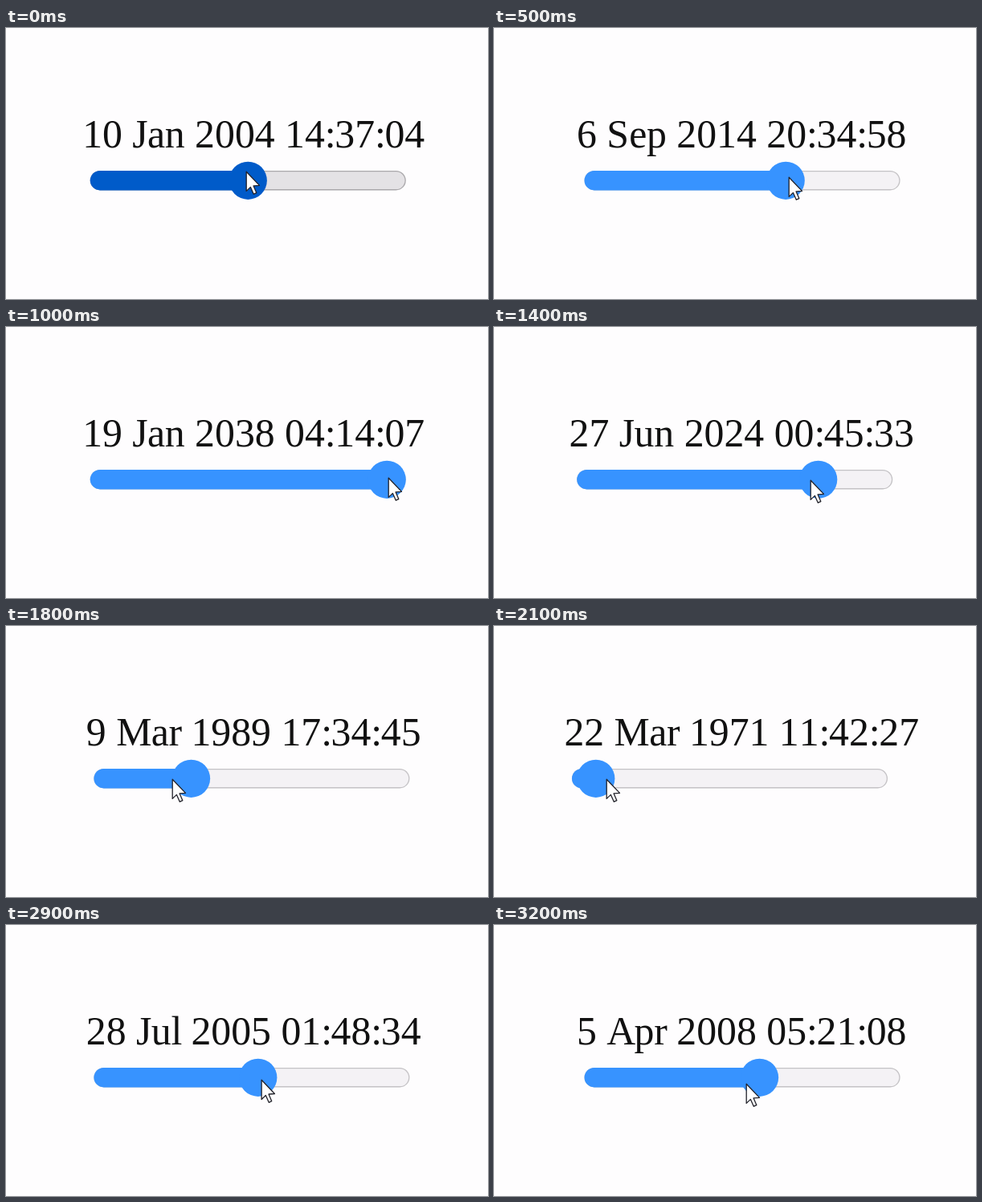
Write an HTML page with a canvas that moves like this. It is 600 px wide and 338 px high and loops after 3300 ms.

```html
<!DOCTYPE html>
<html lang="en">
<head>
<meta charset="utf-8">
<title>Date slider</title>
<style>
  html, body { margin: 0; width: 100%; height: 100%; overflow: hidden; background: #fefdfe; }
  canvas { display: block; }
</style>
</head>
<body>
<canvas id="stage" width="600" height="338"></canvas>
<script>
const ctx = document.getElementById('stage').getContext('2d');
const LOOP = 3300, STEP = 100, PRESS = 3;
const CENTER = 308.2, BASELINE = 148.5, ZOOM = 3.11;
const FAMILY = '"Liberation Serif", "Times New Roman", serif';
const TRACK = { w: 393, y: 178, h: 24.4, inset: 9.6 };
const THUMB = { r: 23.6, y: 190.3 };
const IDLE = { fill: '#005bc9', track: '#e4e2e5', border: '#aaa8ab' };
const ACTIVE = { fill: '#3793ff', track: '#f4f2f5', border: '#c4c2c5' };
const MONTHS = 'Jan Feb Mar Apr May Jun Jul Aug Sep Oct Nov Dec'.split(' ');

const parse = s => Date.parse(s + ' UTC') / 1000;
const MIN = parse('1 Jan 1970 01:00:00'), MAX = parse('19 Jan 2038 04:14:07');

// step, slider date, pointer x, pointer y
const keys = [
  [0, '10 Jan 2004 14:37:04', 299, 179],
  [2, '10 Jan 2004 14:37:04', 299, 179],
  [5, '6 Sep 2014 20:34:58', 367, 186],
  [8, '14 Feb 2032 09:12:41', 455, 188],
  [9, '2 Oct 2037 18:20:13', 474, 188],
  [10, '19 Jan 2038 04:14:07', 476, 188],
  [11, '19 Jan 2038 04:14:07', 472, 189],
  [14, '27 Jun 2024 00:45:33', 394, 191],
  [18, '9 Mar 1989 17:34:45', 207, 191],
  [21, '22 Mar 1971 11:42:27', 140, 191],
  [23, '1 Jan 1970 01:00:00', 133, 190],
  [26, '4 Mar 1976 14:24:31', 171, 188],
  [30, '17 Mar 2013 16:08:52', 354, 195],
  [32, '5 Apr 2008 05:21:08', 314, 198],
  [33, '10 Jan 2004 14:37:04', 299, 179]
].map(([t, date, x, y]) => [t, parse(date), x, y]);

// Smooth curve through one column of the keys
function curve(step, col) {
  let i = 0;
  while (i < keys.length - 2 && keys[i + 1][0] <= step) i++;
  const a = keys[i], b = keys[i + 1];
  const before = keys[Math.max(i - 1, 0)], after = keys[Math.min(i + 2, keys.length - 1)];
  const slope = (p, q) => (q[col] - p[col]) / (q[0] - p[0]);
  const d = b[0] - a[0], u = (step - a[0]) / d;
  if (a[col] === b[col]) return a[col];
  const m0 = slope(before, b) * d, m1 = slope(a, after) * d;
  const u2 = u * u, u3 = u2 * u;
  return (2 * u3 - 3 * u2 + 1) * a[col] + (u3 - 2 * u2 + u) * m0 +
         (3 * u2 - 2 * u3) * b[col] + (u3 - u2) * m1;
}

function format(sec) {
  const d = new Date(sec * 1000);
  const time = [d.getUTCHours(), d.getUTCMinutes(), d.getUTCSeconds()]
    .map(n => String(n).padStart(2, '0')).join(':');
  return `${d.getUTCDate()} ${MONTHS[d.getUTCMonth()]} ${d.getUTCFullYear()} ${time}`;
}

// Magnified 16px text: every glyph advances by whole pixels before zooming
function drawLabel(label) {
  ctx.font = `160px ${FAMILY}`;
  const steps = [...label].map(c => Math.floor(ctx.measureText(c).width / 10 + 0.4) * ZOOM);
  const left = CENTER - steps.reduce((a, b) => a + b) / 2;
  ctx.font = `${16 * ZOOM}px ${FAMILY}`;
  ctx.fillStyle = '#111';
  let x = left;
  [...label].forEach((c, i) => {
    ctx.fillText(c, x, BASELINE);
    x += steps[i];
  });
  return left;
}

function pill(x, y, w, h, color) {
  ctx.fillStyle = color;
  ctx.beginPath();
  ctx.roundRect(x, y, w, h, h / 2);
  ctx.fill();
}

function drawSlider(left, part, look) {
  const { w, y, h } = TRACK;
  const x = left + THUMB.r + part * (w - 2 * THUMB.r);
  pill(left, y, w, h, look.border);
  pill(left + 1.3, y + 1.3, w - 2.6, h - 2.6, look.track);
  ctx.save();
  ctx.beginPath();
  ctx.rect(0, 0, x, 338);
  ctx.clip();
  pill(left, y, w, h, look.fill);
  ctx.restore();
  ctx.fillStyle = look.fill;
  ctx.beginPath();
  ctx.arc(x, THUMB.y, THUMB.r, 0, Math.PI * 2);
  ctx.fill();
}

function drawPointer(x, y) {
  ctx.save();
  ctx.translate(x - 0.5, y - 0.6);
  ctx.beginPath();
  [[0.7, 0.8], [0.7, 25], [5.9, 20], [9.8, 28.8], [13.3, 27.2], [9.6, 18.5], [17, 18]]
    .forEach(p => ctx.lineTo(...p));
  ctx.closePath();
  ctx.fillStyle = '#fff';
  ctx.fill();
  ctx.strokeStyle = '#22222a';
  ctx.lineWidth = 1.3;
  ctx.lineJoin = 'round';
  ctx.stroke();
  ctx.restore();
}

function draw(now) {
  const step = Math.floor((now % LOOP) / STEP);
  const value = Math.round(Math.min(MAX, Math.max(MIN, curve(step, 1))));
  ctx.fillStyle = '#fefdfe';
  ctx.fillRect(0, 0, 600, 338);
  const left = drawLabel(format(value));
  drawSlider(left + TRACK.inset, (value - MIN) / (MAX - MIN), step < PRESS ? IDLE : ACTIVE);
  drawPointer(curve(step, 2), curve(step, 3));
}

const start = performance.now();
function tick() {
  draw(performance.now() - start);
  requestAnimationFrame(tick);
}
tick();
</script>
</body>
</html>
```
